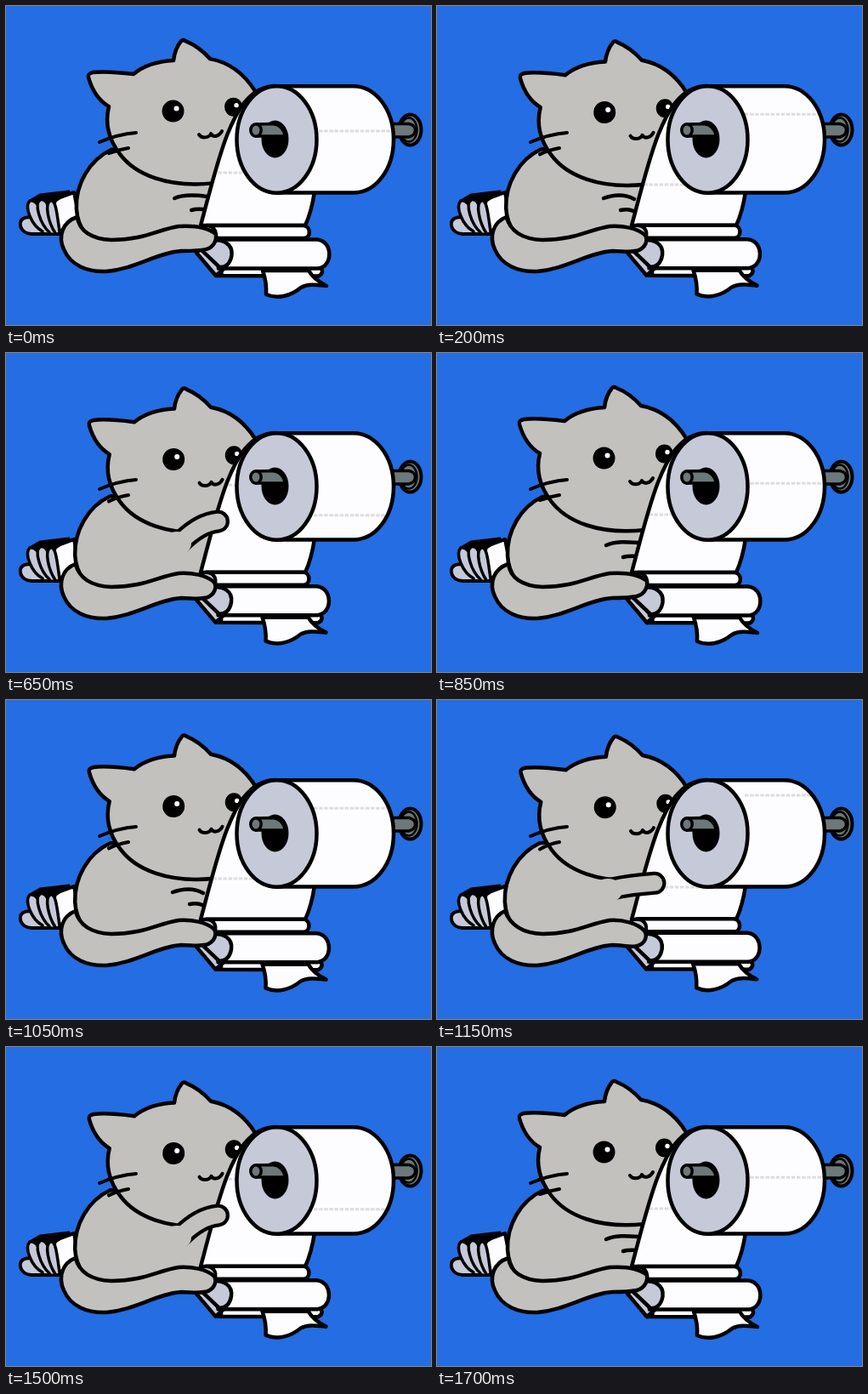
An HTML page with a canvas for the animation above (1750 ms loop, 500x375 px).

```html
<!DOCTYPE html>
<html lang="en">
<head>
<meta charset="utf-8">
<title>Cat unrolling paper</title>
<style>
html, body { margin: 0; width: 100%; height: 100%; overflow: hidden; background: #256de2; }
canvas { display: block; width: 500px; height: 375px; }
</style>
</head>
<body>
<canvas id="stage" width="500" height="375"></canvas>
<script>
const ctx = document.getElementById('stage').getContext('2d');
const BLUE = '#256de2', FUR = '#c3c1bd', PAPER = '#fdfdff', SHADE = '#c6c9d7';
const METAL = '#6c7879', PERF = '#dcdce1', INK = '#000';
const STEP = 50, FRAMES = 35, CYCLE = 17;

const lerp = (a, b, t) => a + (b - a) * t;

// Piecewise linear value through [x, y] keys.
function along(keys, x) {
  let i = 1;
  while (i < keys.length - 1 && x > keys[i][0]) i++;
  const [x0, y0] = keys[i - 1], [x1, y1] = keys[i];
  return lerp(y0, y1, (x - x0) / (x1 - x0));
}

function shape(d, fill, width = 4.5) {
  const path = typeof d === 'string' ? new Path2D(d) : d;
  if (fill) { ctx.fillStyle = fill; ctx.fill(path); }
  if (width) { ctx.lineWidth = width; ctx.strokeStyle = INK; ctx.stroke(path); }
}

function oval(x, y, rx, ry, fill, width = 0) {
  const path = new Path2D();
  path.ellipse(x, y, rx, ry, 0, 0, Math.PI * 2);
  shape(path, fill, width);
}

function clipped(path, draw) {
  ctx.save();
  ctx.clip(path);
  draw();
  ctx.restore();
}

function perforation(x0, x1, y) {
  ctx.save();
  ctx.lineCap = 'butt';
  ctx.setLineDash([4.5, 1.6]);
  ctx.strokeStyle = PERF;
  ctx.lineWidth = 3;
  ctx.beginPath();
  ctx.moveTo(x0, y);
  ctx.lineTo(x1, y);
  ctx.stroke();
  ctx.restore();
}

function backPaper() {
  shape('M56 238 L58 227 L80 219 L86 250 L64 268 Z', PAPER, 4);
  shape('M28 229 L40 222 L74 218 L60 228 L50 234 Z', INK, 3);
  shape('M62 268 L30 268 C16 267 14 254 20 250 C32 244 48 256 54 268', SHADE, 4);
  shape('M43 265 C30 258 21 236 28 229 C38 226 47 250 52 267', SHADE, 3.5);
  shape('M51 266 C40 256 33 233 40 228 C50 224 55 248 58 267', SHADE, 3.5);
  shape('M58 267 C50 255 45 233 52 229 C59 227 60 245 63 265', SHADE, 3.5);
}

function body(c) {
  ctx.save();
  ctx.translate(-4 * c, -c);
  shape('M124 169 C98 181 82 210 83 238 C84 256 94 280 125 284 L246 284 L300 200 L220 160 Z', FUR);
  ctx.restore();
}

const headPath = new Path2D('M245 208 C190 214 152 198 134 174 C121 157 116 138 121 118 ' +
  'C109 111 101 98 97 84 C96 80 98 79 102 78 C117 76 134 78 150 80 C162 70 178 65 197 64 ' +
  'C198 54 202 46 206 41 Q208 39 211 41 C221 45 231 52 240 62 C262 66 280 79 293 100');

function head(c) {
  ctx.save();
  ctx.translate(190 + 1.5 * c, 125 + 3.2 * c);
  ctx.rotate(0.012 * c);
  ctx.translate(-190, -125);
  shape(headPath, FUR);
  oval(196.5, 123.5, 13, 13, INK);
  oval(200.5, 120.5, 3, 3, '#fff');
  oval(267.5, 118.5, 10.5, 11, INK);
  oval(271, 116.5, 2.7, 2.7, '#fff');
  shape('M227 151 C230 156 239 155 241 150 C244 155 251 153 254 147', null, 4);
  ctx.restore();
  shape('M110 160 C124 154 140 150 153 149', null, 4);
  shape(`M121 ${lerp(173, 176, c)} Q132 169 144 167`, null, 4);
}

// Resting forearm, disappearing behind the sheet.
function restingArm(p) {
  const a = p / 4;
  const x = lerp(238, 232, a);
  shape(`M${lerp(199, 196, a)} 226 C210 221 223 222 ${x} ${lerp(223, 227, a)}`, null);
  shape(`M${lerp(219, 216, a)} 240 Q225 238 ${x - 1} ${lerp(239, 241, a)}`, null);
}

function curledPaw() {
  shape('M196 214 C190 204 202 195 213 195 C225 196 229 205 224 212 C220 217 213 214 208 220', FUR, 4);
  shape('M183 217 C186 210 192 209 198 213', null, 4);
  shape('M226 213 L240 210.5', null, 4);
}

function reachingPaw(x, y) {
  const arm = new Path2D(`M206 222 Q228 ${y + 2} ${x} ${y}`);
  for (const [color, width] of [[INK, 27], [FUR, 18.5]]) {
    ctx.strokeStyle = color;
    ctx.lineWidth = width;
    ctx.stroke(arm);
  }
  oval(201, 224, 17, 14, FUR);
}

const sheetPath = new Path2D('M318 94 C285 94 270 127 260 152 C248 183 238 225 229 258 L352 258 ' +
  'C358 245 361 232 363 218 L364 150 Z');

function sheet(marks) {
  shape(sheetPath, PAPER, 0);
  clipped(sheetPath, () => marks.forEach(y => perforation(225, 366, y)));
  shape(sheetPath, null);
}

const rollPath = new Path2D('M318 94.2 L408.5 94.2 C435 94.2 456 122 456 157 C456 192 435 219.6 408.5 219.6 L318 219.6 Z');

function roll(angles) {
  // wall mount
  oval(475.5, 145.5, 13, 18, METAL, 4);
  oval(474, 145.5, 9.5, 14, METAL, 2.5);
  shape('M452 138.5 L474 138.5 C484 140 484 152 474 154 L452 154 Z', METAL, 3.5);

  shape(rollPath, PAPER, 0);
  clipped(rollPath, () => {
    for (const a of angles) {
      if (Math.abs(a) < 1.25) perforation(362, 454, 157 - 62.5 * Math.sin(a));
    }
  });
  shape(rollPath, null);
  oval(318.5, 157, 47, 62.7, SHADE, 4.5);

  oval(316.5, 156.5, 16, 22, INK);
  shape('M294 139 L314 138.5 Q326 140 328.5 153 L294 153 Z', METAL, 3.5);
  oval(294, 146, 6.2, 7.3, METAL, 3.5);
}

function folds(c) {
  ctx.save();
  ctx.translate(-c, -0.8 * c);
  shape('M226 291 L247 317 L368 317.5 Q375 313 370 308 L240 300 Z', PAPER);
  shape('M224 290 L247 317 L262 304 L240 276 Z', SHADE);
  shape('M254 309 L254 317', null, 3.5);
  shape('M302 311 Q307 325 306 339 C319 345 335 341 347 331 C356 326 367 328 377 329 C367 324 360 318 356 311 Z', PAPER);
  shape('M236 258 L350 258 C359 259 359 272 351 273 L236 273 Z', PAPER);
  shape('M230 259 C245 256 249 265 246 274 L228 272 Z', SHADE, 4);
  shape('M250 274.5 L366 274.5 C385 276 385 307 367 308.5 L250 308.5 Z', PAPER);
  shape('M240 276 C257 273 267 281 265.5 293 C264 303 258 308 251 307 L230 287 Z', SHADE);
  ctx.restore();
}

function tail(c) {
  const left = lerp(84, 79, c);
  const x = lerp(247, 243, c), y = lerp(268, 272, c);
  shape(`M${left} 248 C66 254 61 271 68 286 C76 305 96 313 118 312 ` +
    `C152 309 178 290 206 288 C218 288 226 ${y + 20} 235 ${y + 18} ` +
    `C246 ${y + 15} 248 ${y + 5} ${x} ${y} C236 ${y - 9} 218 258 203 259 ` +
    `C178 263 162 275 124 275 C100 274 86 264 ${left} 248 Z`, FUR);
}

function draw(ms) {
  const frame = Math.max(1, Math.floor(ms / STEP) % FRAMES);
  const p = frame % CYCLE;
  const c = (1 - Math.cos(p / CYCLE * Math.PI * 2)) / 2;

  // Paper creeps in the first half of the cycle and is pulled in the second.
  const pull = 1 - Math.pow(1 - Math.max(0, p - 9) / 8, 1.4);
  const marks = [along([[0, 190], [1, 196], [4, 210], [9, 235], [12, 262]], p)];
  const angles = [along([[0, 0.06], [1, 0.16], [4, 0.496], [9, 1.26]], p)];
  if (p > 9) {
    marks.push(lerp(98, 190, pull));
    angles.push(lerp(-1.6, 0.06, pull));
  }

  ctx.fillStyle = BLUE;
  ctx.fillRect(0, 0, 500, 375);
  ctx.lineCap = ctx.lineJoin = 'round';

  backPaper();
  body(c);
  head(c);
  if (p <= 4) restingArm(p);
  if (p === 9) curledPaw();
  sheet(marks);
  if (p > 4 && p < 9) {
    const t = (p - 5) / 3;
    reachingPaw(lerp(252, 264, t), lerp(208, 230, t));
  } else if (p > 9) {
    reachingPaw(along([[10, 224], [12, 250], [16, 248]], p),
      along([[10, 202], [12, 192], [16, 216]], p));
  }
  roll(angles);
  folds(c);
  tail(c);
}

const start = performance.now();
function tick() {
  draw(performance.now() - start);
  requestAnimationFrame(tick);
}
tick();
</script>
</body>
</html>
```
